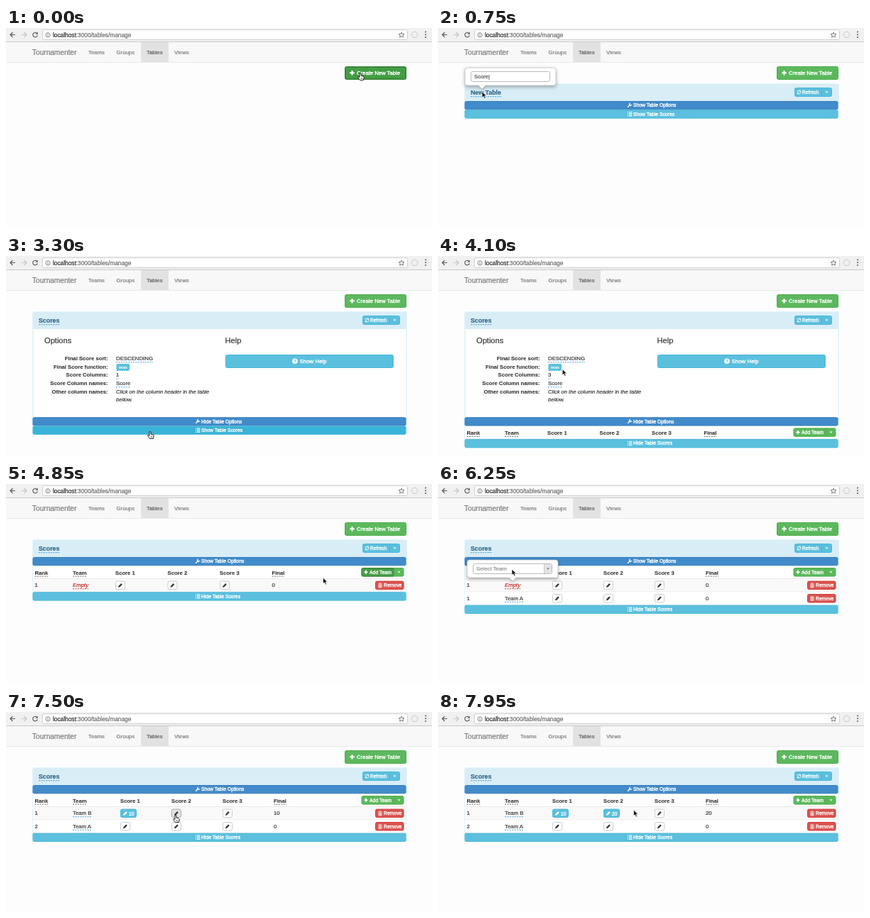
Recreate the animation shown at these times as an HTML page. Size 600 px wide and 282 px high, loop 8000 ms.

```html
<!DOCTYPE html>
<html lang="en">
<head>
<meta charset="utf-8">
<title>Tables</title>
<style>
html, body { margin: 0; width: 100%; height: 100%; overflow: hidden; background: #fdfdfe; }
svg { display: block; }
text { font-family: "Liberation Sans", Arial, sans-serif; white-space: pre; }
.pop { filter: drop-shadow(0 2px 2.5px rgba(0, 0, 0, .3)); }
</style>
</head>
<body>
<svg id="stage" width="600" height="282" viewBox="0 0 600 282"></svg>
<script>
const LOOP = 8000, STEP = 50;
const INFO = '#5bc0de', BLUE = '#428bca', GREEN = '#5cb85c', RED = '#d9534f', INK = '#333';
const TOP = 103, BODY = 124.3, BAR = 12.3, HEAD = 18.6, ROW = 18.4;
const stage = document.getElementById('stage');
const pen = document.createElement('canvas').getContext('2d');

// time, x, y of the pointer tip; a trailing 1 means the hand pointer
const PATH = [
  [0, 499, 63, 1], [150, 499, 63, 1], [400, 62, 88, 1], [900, 62, 90], [1050, 200, 107, 1],
  [1250, 200, 110], [1450, 155, 151.5], [1600, 165, 156, 1], [1900, 165, 134], [2250, 160, 150],
  [2600, 180, 170], [3150, 205, 262], [3300, 203, 247, 1], [3400, 203, 247], [3700, 158, 168, 1],
  [4050, 165, 146], [4250, 230, 232, 1], [4400, 230, 232], [4650, 522, 124, 1], [4750, 522, 124],
  [4850, 446.5, 132], [5000, 105, 140, 1], [5200, 104, 120], [5450, 80, 155], [5750, 522, 124, 1],
  [5850, 522, 124], [6100, 105, 140, 1], [6250, 104, 120], [6350, 104, 120], [6600, 80, 165],
  [6900, 168, 143, 1], [7000, 168, 143], [7300, 300, 105], [7500, 239, 145, 1],
  [7600, 239, 145], [7950, 275.5, 138]
];

const ramp = (t, a, b) => Math.min(1, Math.max(0, (t - a) / (b - a)));
const during = (t, a, b) => t >= a && t < b;

function rect(x, y, w, h, fill, more = '') {
  return `<rect x="${x}" y="${y}" width="${w}" height="${h}" fill="${fill}" ${more}/>`;
}
function box(x, y, w, h, fill, edge, r = 2) {
  return rect(x + .5, y + .5, w - 1, h - 1, fill, `stroke="${edge}" rx="${r}"`);
}
// a thin outline in the text colour gives the heavier look of the page font
function text(x, y, s, size = 7.8, fill = INK, more = '', weight = .18) {
  return `<text x="${x}" y="${y}" font-size="${size}" fill="${fill}" stroke="${fill}" stroke-width="${weight}" ${more}>${s}</text>`;
}
const bold = (x, y, s, size, fill, more = '') => text(x, y, s, size, fill, 'font-weight="700" ' + more, .08);
const white = (x, y, s, size = 6.7) => text(x, y, s, size, '#fff', '', .35);
const path = (d, stroke, w = 1, more = '') =>
  `<path d="${d}" fill="none" stroke="${stroke}" stroke-width="${w}" ${more}/>`;
const at = (x, y, s) => `<g transform="translate(${x} ${y})">${s}</g>`;
const caret = (x, y, fill = '#fff') => `<path d="M${x - 2} ${y - 1}h4l-2 2.2z" fill="${fill}"/>`;

function width(s, size, style = '') {
  pen.font = `${style} ${size * 10}px "Liberation Sans", Arial, sans-serif`;
  return pen.measureText(s).width / 10;
}
function dashes(x, y, w, color = '#08c') {
  return path(`M${x} ${y}h${w}`, color, .8, 'stroke-dasharray="2.2 1.2"');
}
function link(x, y, s, color = INK, dash = '#2a8fc4', style = '', size = 7.8) {
  const look = style === 'bold' ? 'font-weight="700"' : style ? `font-style="${style}"` : '';
  return text(x, y, s, size, color, look) + dashes(x, y + 2.7, width(s, size, style), dash);
}

const icon = {
  plus: (x, y, s = 3) => path(`M${x - s} ${y}h${2 * s}M${x} ${y - s}v${2 * s}`, '#fff', s * .6),
  pencil: (x, y, c) => at(x, y, `<path d="M-3 3l.6-2.2L1.2-2.8 2.8-1.2-.8 2.4z" fill="${c}"/>`),
  wrench: (x, y) => path(`M${x - 2.4} ${y + 2.4}L${x + .8} ${y - .8}`, '#fff', 1.5, 'stroke-linecap="round"') +
    path(`M${x + .7} ${y - 2.8}a1.7 1.7 0 1 0 2.1 2.1`, '#fff', 1.1),
  list: (x, y) => [-2.4, -.6, 1.2, 3].map(d => path(`M${x - 3} ${y + d}h1m1 0h4.4`, '#fff')).join(''),
  trash: (x, y) => path(`M${x - 2.6} ${y - 2}h5.2M${x - .9} ${y - 3}h1.8M${x - 2} ${y - 1.4}v4.4h4v-4.4M${x - .6} ${y - 1}v3.4M${x + .7} ${y - 1}v3.4`, '#fff', .8),
  refresh: (x, y, c = '#fff', r = 2.5) =>
    path(`M${x - r} ${y}a${r} ${r} 0 0 1 ${r * 1.8} ${-r * .6}M${x + r} ${y}a${r} ${r} 0 0 1 ${-r * 1.8} ${r * .6}`, c, 1) +
    `<path d="M${x + r} ${y - r - .4}v2.4h-2.4zM${x - r} ${y + r + .4}v-2.4h2.4z" fill="${c}"/>`,
  help: (x, y) => `<circle cx="${x}" cy="${y}" r="3.8" fill="#fff"/>` +
    bold(x, y + 2.4, '?', 6.8, INFO, 'text-anchor="middle"')
};

function toolbar() {
  const arrow = (x, d, c) => path(`M${x - 3.5 * d} 9.5h${7 * d}M${x} 6l${3.5 * d} 3.5l${-3.5 * d} 3.5`, c, 1.1);
  const dots = [5.5, 9.2, 12.9].map(y => `<circle cx="591" cy="${y}" r="1" fill="#555"/>`).join('');
  return rect(0, 0, 600, 20, '#f1f1f2') + rect(0, 19, 600, 1, '#c9c9c9') +
    arrow(9.5, -1, '#555') + arrow(25.5, 1, '#c4c4c4') +
    path('M43.6 7.4a3.3 3.3 0 1 0 .7 3', '#555', 1.1) + '<path d="M44.7 5.6v3.2h-3.2z" fill="#555"/>' +
    box(51, 2, 515, 15, '#fff', '#cfcfcf') +
    '<circle cx="59" cy="9.8" r="3.1" fill="none" stroke="#666" stroke-width=".8"/>' +
    path('M59 9.3v2.2M59 7.8v.8', '#666', .9) +
    text(66, 12.6, 'localhost<tspan fill="#666" stroke="#666">:3000/tables/manage</tspan>', 8.3, '#222') +
    path('M557 6l1.1 2.5 2.7.2-2 1.8.6 2.7-2.4-1.5-2.4 1.5.6-2.7-2-1.8 2.7-.2z', '#555', .8) +
    '<circle cx="575.5" cy="9.5" r="4.2" fill="#f1f1f2" stroke="#c8c8c8"/>' + dots;
}

function navbar() {
  return rect(0, 20, 600, 28.5, '#f8f8f8') + rect(190, 20, 39, 28, '#e2e2e2') +
    rect(0, 48, 600, .8, '#e7e7e7') + text(37, 37.6, 'Tournamenter', 10.1, '#777') +
    text(116, 37, 'Teams', 7.8, '#777') + text(155.5, 37, 'Groups', 7.8, '#777') +
    text(198, 37, 'Tables', 7.8, '#555') + text(237, 37, 'Views', 7.8, '#777');
}

function createButton(t) {
  const down = t < 150;
  return box(477, 54, 87, 19, down ? '#449d44' : GREEN, down ? '#398439' : '#4cae4c') +
    (down ? rect(478.5, 55.5, 84, 16, 'none', 'stroke="#2f6f2f" stroke-width=".7" stroke-dasharray="1 1"') : '') +
    icon.plus(487.5, 63.3, 3.3) + white(494, 66, 'Create New Table', 7.7);
}

function header(t) {
  return rect(38, 79, 526, 24, '#d9edf7') +
    link(46, 94, t < 850 ? 'New Table' : 'Scores', '#2d6887', '#2a8fc4', 'bold', 8.8) +
    box(502, 84, 53, 13, INFO, '#46b8da') + path('M540.5 84v13', '#46b8da', .8) +
    icon.refresh(508.5, 90.5) + white(513, 93, 'Refresh') + caret(547.5, 90.5);
}

function options(t, h) {
  const labels = ['Final Score sort:', 'Final Score function:', 'Score Columns:', 'Score Column names:', 'Other column names:'];
  const func = t < 2300 ? 'sum' : 'max';
  const left = labels.map((s, i) => bold(143.5, 147 + i * 11.7, s, 7.7, INK, 'text-anchor="end"')).join('');
  const italic = (y, s) => text(155, y, s, 7.6, INK, 'font-style="italic"');
  const body = text(54, 123, 'Options', 11.1) + text(308.5, 123, 'Help', 11.1) + left +
    link(155, 147, 'DESCENDING') +
    rect(155.5, 152, 18.5, 9, INFO, 'rx="1.5"') +
    bold(164.8, 158.5, func, 5.9, '#fff', 'text-anchor="middle"') + dashes(156, 161.4, 18) +
    link(155, 170.4, t < 4000 ? '1' : '3') + link(155, 182.1, 'Score') +
    italic(193.8, 'Click on the column header in the table') + italic(205.4, 'bellow.') +
    box(309, 139, 237, 19, INFO, '#46b8da') + icon.help(407, 148.3) + white(413.5, 151, 'Show Help', 7.9);
  return `<svg x="0" y="${TOP}" width="600" height="${h}" viewBox="0 ${TOP} 600 ${h}">${body}</svg>`;
}

function bar(y, fill, edge, mark, label) {
  return box(37.5, y, 526, BAR, fill, edge, 1.5) + mark(270, y + 5.8) + white(275, y + 8.2, label, 6.8);
}

function scoreCell(x, y, value, hover) {
  if (!value) return box(x, y, 14, 12.5, hover ? '#e3e3e3' : '#fff', hover ? '#aaa' : '#ccc') + icon.pencil(x + 7, y + 6.3, INK);
  return box(x, y, 23, 12.5, INFO, '#46b8da') + icon.pencil(x + 7, y + 6.3, '#fff') + white(x + 12, y + 8.9, value);
}

function teams(t) {
  const a = t < 5500 ? '' : 'Team A', b = t < 6650 ? '' : 'Team B';
  if (t < 4750) return [];
  if (t < 5850) return [{ rank: 1, name: a, scores: ['', '', ''] }];
  const one = t < 7300 ? '' : '10', two = t < 7850 ? '' : '20';
  return [
    { rank: 1, name: b, scores: [one, two, ''] },
    { rank: one ? 2 : 1, name: a, scores: ['', '', ''] }
  ];
}

function addButton(y, down) {
  return box(500.5, y, 60, 12.5, GREEN, '#4cae4c') +
    (down ? box(500.5, y, 46.5, 12.5, '#449d44', '#398439') : '') +
    path(`M546.5 ${y}v12`, '#4cae4c', .8) + icon.plus(507, y + 6.2, 2.7) +
    white(512, y + 8.8, 'Add Team', 6.9) + caret(553.5, y + 6.2);
}

function table(t, y, rows) {
  const named = t >= 5500;
  const col = i => named ? 161 + 72 * i : 154 + 73.5 * i;
  const down = during(t, 4650, 5000) || during(t, 5750, 5900);
  const head = (x, s, dash) => bold(x, y + 12.4, s, 7.7) + (dash ? dashes(x, y + 14.8, width(s, 7.7, 'bold'), '#555') : '');
  const names = t < 4000 ? ['Score'] : ['Score 1', 'Score 2', 'Score 3'];
  let out = rect(38, y, 526, HEAD + rows.length * ROW, '#fff') +
    head(40.5, 'Rank', true) + head(94, 'Team', true) +
    names.map((s, i) => head(col(i), s)).join('') + head(col(3), 'Final', true) +
    addButton(y + 2.8, down) + rect(38, y + 18, 526, 1, '#ddd');
  rows.forEach((r, i) => {
    const top = y + HEAD + i * ROW, base = top + 11.2;
    const best = Math.max(...r.scores.map(Number));
    out += rect(38, top, 526, 18, i % 2 ? '#fff' : '#f9f9f9') + text(40.5, base, r.rank) +
      (r.name ? link(94, base, r.name) : link(94, base, 'Empty', '#d11a1a', '#d11a1a', 'italic')) +
      r.scores.map((s, j) => scoreCell(col(j), top + 2.7, s, i === 0 && j === 1 && during(t, 7450, 7650))).join('') +
      text(col(3), base, best) + box(520, top + 2.7, 40.5, 12.5, RED, '#d43f3a') +
      icon.trash(527, top + 9) + white(532, top + 11.5, 'Remove', 6.8) +
      rect(38, top + 17.8, 526, .7, '#ddd');
  });
  return out;
}

function panel(t) {
  const open = ramp(t, 1100, 1250) - ramp(t, 4250, 4400);
  const shown = t >= 3350, rows = teams(t);
  const optY = TOP + BODY * open;
  let y = optY + BAR, list = '';
  if (shown) {
    list = table(t, y, rows);
    y += HEAD + rows.length * ROW;
  }
  const hover = during(t, 3250, 3450), focus = during(t, 1050, 1900);
  return rect(38, 79, 526, y + BAR - 79.5, '#fff', 'stroke="#bce8f1" stroke-width=".8" rx="2"') + header(t) +
    (open > 0 ? options(t, BODY * open) : '') + list +
    bar(optY, focus ? '#3276b1' : BLUE, focus ? '#2a7fd8' : '#357ebd', icon.wrench, (open > .5 ? 'Hide' : 'Show') + ' Table Options') +
    bar(y, hover ? '#39b3d7' : INFO, '#46b8da', icon.list, (shown ? 'Hide' : 'Show') + ' Table Scores');
}

function popover(cx, tip, w, inner) {
  const x = Math.max(38, cx - w / 2), y = tip - 30;
  const shape = rect(x, y, w, 25, '#fff', 'stroke="#bbb" stroke-width=".7" rx="3.5"') +
    `<path d="M${cx - 5.5} ${y + 24.6}l5.5 5.4 5.5-5.4z" fill="#fff"/>`;
  return `<g class="pop">${shape}</g>` + path(`M${cx - 5.5} ${y + 25}l5.5 5.2 5.5-5.2`, '#bbb', .7) +
    box(x + 8, y + 5, w - 16, 15, '#fff', '#bbb') + inner(x + 8, y + 5, w - 16);
}
const field = s => (x, y) => text(x + 5, y + 10.4, s + '<tspan fill="#666">|</tspan>', 7.7, '#444');

function select(label, color, open, items, pick) {
  return (x, y, w) => {
    let out = rect(x + w - 11.5, y + 1, 10.5, 13, '#e4e4e4') + path(`M${x + w - 11.5} ${y + 1}v13`, '#bbb', .7) +
      caret(x + w - 6, y + 7.5, '#777') + text(x + 5, y + 10.4, label, 7.8, color);
    if (!open) return out;
    out += box(x, y + 14, w, items.length * 13 + 20, '#fff', '#aaa') + box(x + 3, y + 17, w - 6, 13, '#fff', '#bbb');
    items.forEach((s, i) => {
      const on = i === pick;
      out += (on ? rect(x + 2, y + 32 + i * 13, w - 4, 12.5, '#3875d7') : '') +
        text(x + 5, y + 41 + i * 13, s, 7.7, on ? '#fff' : INK);
    });
    return out;
  };
}

function popovers(t) {
  const typed = (s, a, b) => s.slice(0, Math.floor(ramp(t, a, b) * s.length));
  const team = (a, b, pick) => popover(105, 137, 128,
    select('Select Team', '#888', t >= a, ['Team A', 'Team B'], t >= b ? pick : -1));
  if (during(t, 450, 850)) return popover(62, 86, 128, field(typed('Scores', 500, 800)));
  if (during(t, 1650, 2300)) return popover(165, 152, 100, select('sum', '#444', t >= 1950, ['sum', 'max'], t < 2150 ? 0 : 1));
  if (during(t, 3700, 4000)) return popover(158, 163, 100, field(t < 3850 ? '1' : '3'));
  if (during(t, 5050, 5500)) return team(5250, 5400, 0);
  if (during(t, 6150, 6650)) return team(6350, 6500, 1);
  return '';
}

function dialog(t) {
  const second = t >= 7600, start = second ? 7650 : 6950, end = second ? 7850 : 7300;
  if (!during(t, start, end)) return '';
  const value = (second ? '20' : '10').slice(0, t < start + 50 ? 0 : t < start + 100 ? 1 : 2);
  return rect(0, 20, 600, 262, '#000', 'opacity=".5"') +
    box(132, 37, 336, 82, '#fff', '#999', 3) + text(141, 52, second ? 'Score 2' : 'Score 1', 10) +
    rect(133, 59, 334, .7, '#e5e5e5') + box(141, 66, 318, 19, '#fff', '#66afe9') +
    text(148, 78.4, value + '<tspan fill="#666">|</tspan>') + rect(133, 92, 334, .7, '#e5e5e5') +
    box(393, 96, 36, 18, '#fff', '#ccc') + text(399, 108, 'Cancel', 7.4) +
    box(433, 96, 26, 18, BLUE, '#357ebd') + white(440.5, 108, 'OK', 7.4);
}

function pointer(t) {
  let i = PATH.length - 1;
  while (i > 0 && PATH[i][0] > t) i--;
  const p = PATH[i], q = PATH[i + 1] || p;
  const k = ramp(t, p[0], q[0] + .001), e = k * k * (3 - 2 * k);
  const x = p[1] + (q[1] - p[1]) * e, y = p[2] + (q[2] - p[2]) * e;
  const still = p[1] === q[1] && p[2] === q[2];
  const hand = p[3] && (still || k < .3);
  return at(x, y, hand
    ? '<path d="M-1 1Q0-.4 1 1V4.2L4.4 5.2Q5.4 5.6 5.2 7L4.4 10.5H-.6L-3.4 6.6Q-3.6 5.2-2.2 5.6L-1 6.6Z" fill="#fff" stroke="#111" stroke-width=".9"/>' +
      path('M1.2 7v2M2.8 7.2v1.8', '#111', .6)
    : '<path d="M0 0V8.6L2 6.8 3.4 10 5 9.3 3.6 6.2H6.2Z" fill="#111" stroke="#fff" stroke-width=".7"/>');
}

function draw(t) {
  stage.innerHTML = rect(0, 0, 600, 282, '#fdfdfe') + navbar() + createButton(t) +
    (t >= 150 ? panel(t) : '') + popovers(t) + dialog(t) + toolbar() + pointer(t);
}

const begin = performance.now();
let last = -1;
function tick() {
  const t = Math.floor(((performance.now() - begin) % LOOP) / STEP) * STEP;
  if (t !== last) draw(last = t);
  requestAnimationFrame(tick);
}
tick();
</script>
</body>
</html>
```
